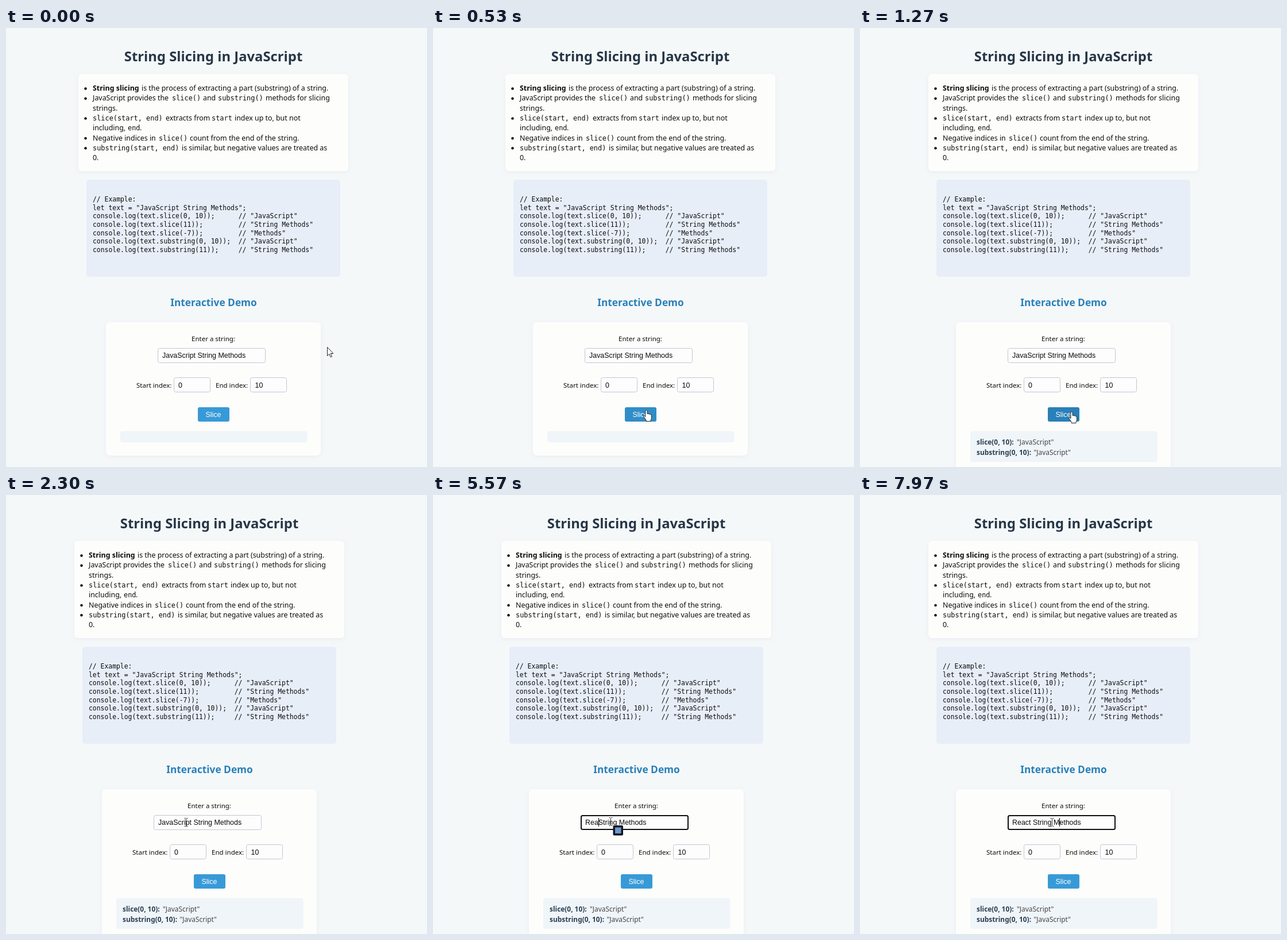
An HTML page that plays this animation: 733 by 764 pixels, repeating every 8000 ms.

```html
<!DOCTYPE html>
<html lang="en">
<head>
<meta charset="utf-8">
<title>String Slicing in JavaScript</title>
<style>
  html, body { margin: 0; width: 100%; height: 100%; overflow: hidden; background: #f5f8f9; }
  svg { display: block; width: 100%; height: 100%; }
  text { font: 12.4px "Noto Sans", "Open Sans", sans-serif; fill: #0c0c0c; white-space: pre; }
  .bold { font-weight: 700; }
  .inline { font: 11.9px "DejaVu Sans Mono", monospace; }
  .code { font: 11.4px "DejaVu Sans Mono", monospace; }
  .title { font-size: 23.8px; font-weight: 700; fill: #263646; text-anchor: middle; }
  .subtitle { font-size: 17.3px; font-weight: 700; fill: #2980b9; text-anchor: middle; }
  .label { font-size: 11.5px; }
  .field { font: 12.45px "Liberation Sans", Arial, sans-serif; }
  .button { font: 12.45px "Liberation Sans", Arial, sans-serif; fill: #fff; text-anchor: middle; }
  .key { font-size: 11.9px; font-weight: 700; fill: #2c3e50; }
  .value { font-size: 11.9px; fill: #444; }
  .card { fill: #fdfdfc; filter: drop-shadow(0 2px 4px rgba(40, 60, 100, .06)); }
  .input { fill: #fdfdfd; stroke: #c3c6d6; }
  .panel { fill: #eff5f9; }
</style>
</head>
<body>
<svg viewBox="0 0 733 764" preserveAspectRatio="none">
  <g id="page">
    <rect class="card" x="126" y="80" width="470" height="169" rx="6"/>
    <rect x="140" y="264" width="442" height="169" rx="5" fill="#e8eef8"/>
    <rect class="card" id="demo" x="174" y="512" width="374" height="232" rx="7"/>
    <rect class="input" id="box" x="264.5" y="557.5" width="187" height="25" rx="3"/>
    <rect id="ring" x="265" y="558" width="186" height="24" rx="2.5" fill="none" stroke="#101010" stroke-width="2"/>
    <rect class="input" x="292.5" y="608.5" width="63" height="25" rx="3"/>
    <rect class="input" x="425.5" y="608.5" width="63" height="25" rx="3"/>
    <rect id="button" x="334" y="660" width="55" height="25" rx="3"/>
    <rect class="panel" id="panel" x="199" y="701.5" width="325.5" height="19.5" rx="4"/>
    <g id="copy"></g>
    <g id="result"></g>
    <rect id="selection" x="272" y="562" height="16" fill="#0078d7"/>
    <text class="field" x="272" y="574"><tspan id="head"></tspan><tspan id="tail"></tspan></text>
    <rect id="caret" y="562" width="1" height="15"/>
  </g>
  <g id="badge">
    <rect x="313.5" y="575" width="17.5" height="17.5" rx="2" fill="#11161f"/>
    <rect x="317" y="578.5" width="10.5" height="10.5" fill="#6c97cf"/>
  </g>
  <g id="pointer" stroke-linejoin="round">
    <path id="arrow" d="M0 0V15L3.4 11.8 5.8 17.4 8 16.4 5.7 11H10.3Z" fill="#fff" stroke="#222"/>
    <path id="hand" d="M-1.6 1.6Q0 -1 1.6 1.6V7Q3.4 5.6 4.6 7.6 6.4 6.6 7.2 8.4 9 7.8 9 10V14Q9 16 7.6 18V20H-.4V18L-4.6 12Q-5.4 9.6-3.2 10.2L-1.6 12Z" fill="#fff" stroke="#222"/>
    <path id="beam" d="M-3 -7H-1L0 -6 1 -7H3M0 -6V6M-3 7H-1L0 6 1 7H3" fill="none" stroke="#333"/>
  </g>
</svg>
<script>
const LOOP = 8000, CLICK = 1000, FOCUS = 3000, BLINK = 530;
const $ = id => document.getElementById(id);

function add(parent, tag, attrs, content = "") {
  const node = document.createElementNS("http://www.w3.org/2000/svg", tag);
  for (const name in attrs) node.setAttribute(name, attrs[name]);
  node.textContent = content;
  return $(parent).appendChild(node);
}
const write = (parent, cls, x, y, content) => add(parent, "text", { class: cls, x, y }, content);

write("copy", "title", 361, 58, "String Slicing in JavaScript");
write("copy", "subtitle", 361.5, 484, "Interactive Demo");

// Each line holds runs of [x, text, class].
const notes = [
  [[151, "String slicing", "bold"], [236, "is the process of extracting a part (substring) of a string."]],
  [[151, "JavaScript provides the"], [289, "slice()", "inline"], [343, "and"],
   [369, "substring()", "inline"], [452, "methods for slicing"]],
  [[151, "strings."]],
  [[151, "slice(start, end)", "inline"], [278, "extracts from"], [358, "start", "inline"], [398, "index up to, but not"]],
  [[151, "including,"], [212, "end", "inline"], [233, "."]],
  [[151, "Negative indices in"], [266, "slice()", "inline"], [320, "count from the end of the string."]],
  [[151, "substring(start, end)", "inline"], [306, "is similar, but negative values are treated as"]],
  [[151, "0."]]
];
notes.forEach((runs, i) => {
  const y = 109 + i * 17.3;
  for (const [x, content, cls = ""] of runs) write("copy", cls, x, y, content);
  if (![2, 4, 7].includes(i)) add("copy", "circle", { cx: 138.5, cy: y - 3.5, r: 2.2 });
});

const example = [
  '// Example:',
  'let text = "JavaScript String Methods";',
  'console.log(text.slice(0, 10));      // "JavaScript"',
  'console.log(text.slice(11));         // "String Methods"',
  'console.log(text.slice(-7));         // "Methods"',
  'console.log(text.substring(0, 10));  // "JavaScript"',
  'console.log(text.substring(11));     // "String Methods"'
];
example.forEach((line, i) => write("copy", "code", 151, 302 + i * 14.67, line));

write("copy", "label", 323, 545, "Enter a string:");
write("copy", "label", 227, 626, "Start index:");
write("copy", "label", 365, 626, "End index:");
write("copy", "field", 300, 626, "0");
write("copy", "field", 433.5, 626, "10");
write("copy", "button", 361, 677, "Slice");
write("result", "key", 210, 725, "slice(0, 10):");
write("result", "value", 280, 725, '"JavaScript"');
write("result", "key", 210, 742.5, "substring(0, 10):");
write("result", "value", 309.5, 742.5, '"JavaScript"');

// Pointer stops: time, x, y.
const path = [
  [30, 559, 555], [460, 371, 664], [560, 371, 664], [1000, 368, 667], [1600, 368, 667],
  [2200, 313, 569], [2350, 313, 569], [2900, 293, 568], [4100, 293, 568], [4300, 309, 568],
  [7400, 309, 568], [7650, 348, 569], [7720, 348, 569], [7900, 334, 569]
];

// Field contents: time, text before the caret, text after it, selected.
const edits = [
  [0, "", "JavaScript String Methods"],
  [FOCUS, "Java", "Script String Methods"],
  [4000, "JavaScript ", "String Methods", true],
  [4900, "R", "String Methods"],
  [5150, "Re", "String Methods"],
  [5400, "Rea", "String Methods"],
  [5750, "Reac", "String Methods"],
  [6000, "React", "String Methods"],
  [6300, "React ", "String Methods"],
  [7700, "React String M", "ethods"]
];

const clamp = v => Math.min(1, Math.max(0, v));
const smooth = v => v * v * (3 - 2 * v);
const show = (id, on) => { $(id).style.display = on ? "" : "none"; };

function pointerAt(t) {
  const next = path.findIndex(stop => stop[0] > t);
  if (next === 0) return path[0].slice(1);
  if (next < 0) return path.at(-1).slice(1);
  const [t0, x0, y0] = path[next - 1], [t1, x1, y1] = path[next];
  const k = smooth((t - t0) / (t1 - t0));
  return [x0 + (x1 - x0) * k, y0 + (y1 - y0) * k];
}

function cursorKind(x, y) {
  const inside = (l, t, r, b) => x >= l && x <= r && y >= t && y <= b;
  if (inside(333, 660, 389, 686)) return "hand";
  const text = inside(264, 557, 452, 583) || inside(292, 608, 356, 634) || inside(425, 608, 489, 634);
  return text ? "beam" : "arrow";
}

function render(t) {
  const clicked = t >= CLICK, focused = t >= FOCUS, shift = clicked ? -7 : 0;
  $("page").setAttribute("transform", `translate(${shift} 0)`);
  $("demo").setAttribute("height", clicked ? 266 : 232);
  $("panel").setAttribute("height", clicked ? 53.5 : 19.5);
  show("result", clicked);
  show("ring", focused);

  const hover = clamp((t - 430) / 200) - clamp((t - 1690) / 200);
  const mix = (a, b) => Math.round(a + (b - a) * hover);
  $("button").style.fill = `rgb(${mix(55, 41)},${mix(154, 128)},${mix(215, 184)})`;

  const [since, head, tail, selected] = edits.findLast(edit => edit[0] <= t);
  $("head").textContent = head;
  $("tail").textContent = tail;
  $("head").style.fill = selected ? "#fff" : "";
  const width = head ? $("head").getComputedTextLength() : 0;
  $("selection").setAttribute("width", width);
  $("caret").setAttribute("x", Math.round(272 + width));
  show("selection", selected);
  show("caret", focused && !selected && (t - since) % (2 * BLINK) < BLINK);
  show("badge", t >= 4350 && t < 7700);

  const [x, y] = pointerAt(t), kind = cursorKind(x - shift, y);
  $("pointer").setAttribute("transform", `translate(${Math.round(x) + .5} ${Math.round(y) + .5})`);
  for (const id of ["arrow", "hand", "beam"]) show(id, id === kind);
}

const start = performance.now();
function tick() {
  render((performance.now() - start) % LOOP);
  requestAnimationFrame(tick);
}
tick();
</script>
</body>
</html>
```
